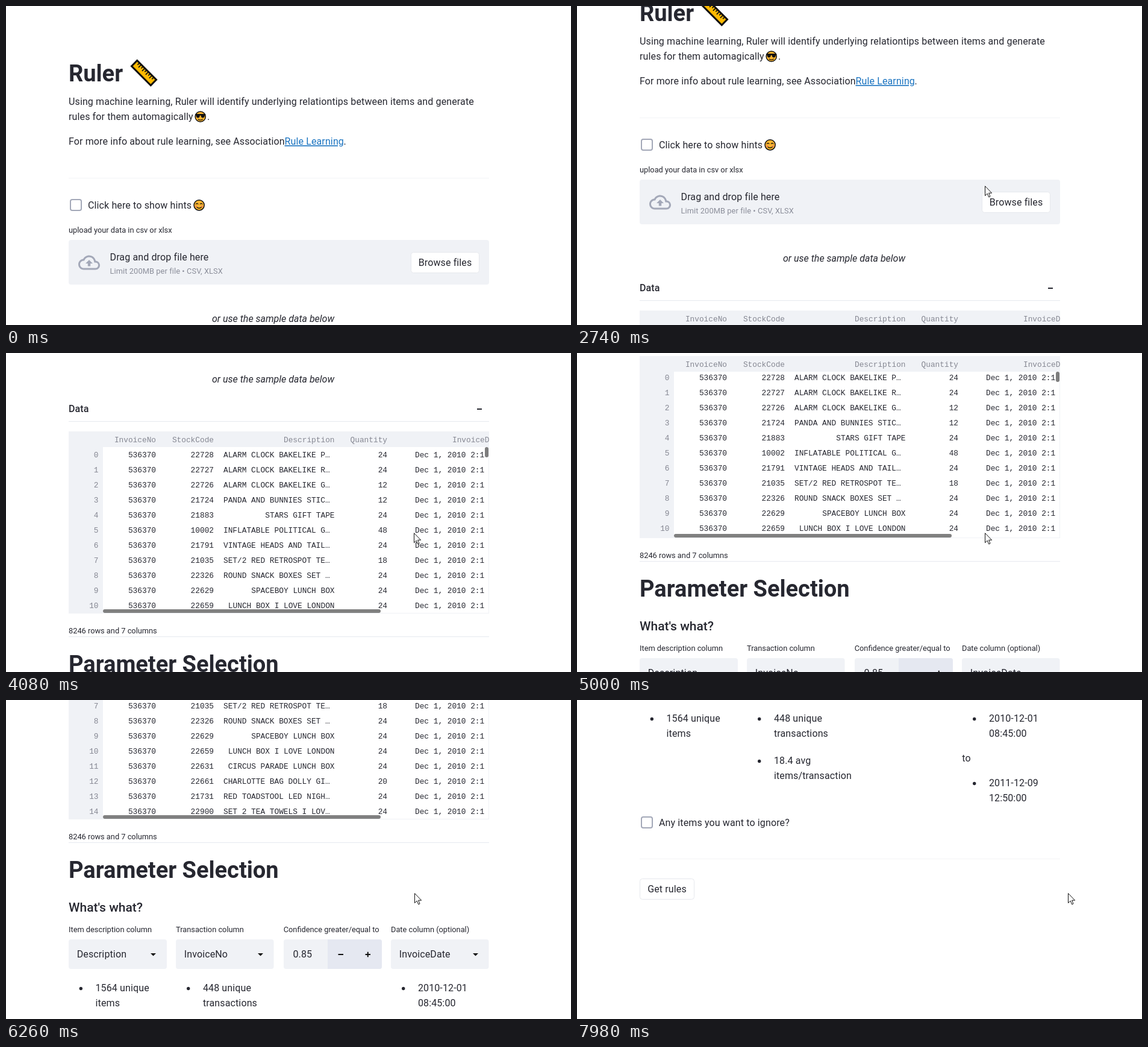
These frames come from a looping animation (938x529 px, 8 s). An HTML page:

```html
<!DOCTYPE html>
<html lang="en">
<head>
<meta charset="utf-8">
<title>Rule learning app</title>
<style>
  html, body { margin: 0; width: 100%; height: 100%; overflow: hidden; background: #fff; }
  svg { display: block; }
  text { font: 400 16px Roboto, sans-serif; letter-spacing: .008em; fill: #262730; }
  .h1 { font-weight: 700; font-size: 38px; letter-spacing: 0; }
  .h2 { font-weight: 500; font-size: 21px; letter-spacing: 0; }
  .bold { font-weight: 500; }
  .small { font-size: 12.8px; letter-spacing: 0; }
  .hint { font-size: 12.8px; fill: #8a8d99; }
  .italic { font-style: italic; letter-spacing: 0; }
  .link { fill: #1a73c0; text-decoration: underline; }
  .mono, .head { font: 12.8px "Liberation Mono", monospace; letter-spacing: 0; white-space: pre; }
  .head { fill: #858792; }
  .mid { text-anchor: middle; }
  .end { text-anchor: end; }
  .hover rect { stroke: #f63366; }
  .hover text { fill: #f63366; }
</style>
</head>
<body>
<svg id="stage" width="938" height="529" viewBox="0 0 938 529"></svg>
<script>
const LOOP = 8000;
const GREY = '#f0f2f6', LINE = '#e6e9ef', FAINT = '#f3f4f6', INK = '#262730';

// ---- drawing helpers ----
const text = (x, y, str, cls = '') => `<text x="${x}" y="${y}" class="${cls}">${str}</text>`;
const rect = (x, y, w, h, fill, r = 0, more = '') =>
  `<rect x="${x}" y="${y}" width="${w}" height="${h}" rx="${r}" fill="${fill}" ${more}/>`;
const path = (d, more) => `<path d="${d}" ${more}/>`;
const dot = (x, y, r = 2.7, fill = INK) => `<circle cx="${x}" cy="${y}" r="${r}" fill="${fill}"/>`;
const group = (x, y, body, more = '') => `<g transform="translate(${x} ${y}) ${more}">${body}</g>`;
const rule = (y, color) => rect(104, y, 698, 1, color);
const checkbox = (y, label) =>
  rect(107, y + 1, 18, 18, '#fff', 3, 'stroke="#a3a8b8" stroke-width="2"') + text(136, y + 16, label);
const button = (x, y, w, label) =>
  rect(x + .5, y + .5, w - 1, 34, '#fff', 4, 'stroke="#e6e8ed"') + text(x + w / 2, y + 23, label, 'mid');
const caret = (x, y) => path(`M${x - 4.5} ${y - 2}h9l-4.5 4.5z`, 'fill="#111"');
const bullet = (x, y, ...lines) =>
  dot(x, y - 4.5) + lines.map((line, i) => text(x + 24.2, y + 25 * i, line)).join('');
const select = (x, label, value, w = 162.5) =>
  text(x, 1094, label, 'small') + rect(x, 1106, w, 49, GREY, 4) +
  text(x + 13.7, 1136, value) + caret(x + 140.5, 1131);

// ---- emoji ----
function rulerEmoji() {
  let ticks = '';
  for (let i = 0; i < 9; i++) ticks += `M${-17 + i * 4.2}-6v${i % 2 ? 6 : 4}`;
  return group(229, 111,
    rect(-22.5, -6.5, 45, 13, '#ffb900', 0, 'stroke="#111" stroke-width="3"') +
    path(ticks, 'stroke="#111" stroke-width="1.7"'), 'rotate(45)');
}
const face = `<circle r="8.6" fill="#fcb52f" stroke="#111" stroke-width="1.5"/>`;
const coolEmoji = () => group(322.7, 183.5, face +
  path('M-8.5-4.5h17v2.5h-1.2Q6.8 2 4 2 1.2 2 .8-2h-1.6Q-1.2 2-4 2-6.8 2-7.3-2h-1.2z', 'fill="#111"') +
  path('M-4 4.2Q0 7 4 4.2', 'fill="none" stroke="#111" stroke-width="1.3"'));
const smileEmoji = () => group(320.6, 330.3, face + dot(-5, 2, 1.8, '#f78a4e') + dot(5, 2, 1.8, '#f78a4e') +
  path('M-5.5-1.5q2-3 4 0M1.5-1.5q2-3 4 0M-4 3.2Q0 6.8 4 3.2', 'fill="none" stroke="#111" stroke-width="1.3"'));

// ---- page sections, in page coordinates ----
const intro = () =>
  text(104, 125, 'Ruler', 'h1') + rulerEmoji() +
  text(104, 164, 'Using machine learning, Ruler will identify underlying relationtips between items and generate') +
  text(104, 189, 'rules for them automagically') + coolEmoji() + text(334, 189, '.') +
  text(104, 230, 'For more info about rule learning, see Association') +
  text(462.5, 230, 'Rule Learning', 'link') + text(560.5, 230, '.') +
  rule(285, FAINT) + checkbox(320, 'Click here to show hints') + smileEmoji();

const CLOUD = 'M19.35 10.04C18.67 6.59 15.64 4 12 4 9.11 4 6.6 5.64 5.35 8.04 2.34 8.36 0 10.91 0 14c0 3.31 2.69 6 6 6h13' +
  'c2.76 0 5-2.24 5-5 0-2.64-2.05-4.78-4.65-4.96zM19 18H6c-2.21 0-4-1.79-4-4 0-2.05 1.53-3.76 3.56-3.97l1.07-.11.5-.95' +
  'C8.08 7.14 9.94 6 12 6c2.62 0 4.88 1.86 5.39 4.43l.3 1.5 1.53.11A2.98 2.98 0 0 1 22 15c0 1.65-1.35 3-3 3z' +
  'M8 13h2.55v3h2.9v-3H16l-4-4z';

const upload = () =>
  text(104, 376, 'upload your data in csv or xlsx', 'small') +
  rect(104, 388, 698, 74, GREY, 4) +
  group(120, 407.5, path(CLOUD, 'fill="#a3a8b8" fill-rule="evenodd"'), 'scale(1.5)') +
  text(172.5, 422, 'Drag and drop file here') +
  text(172.5, 444, 'Limit 200MB per file • CSV, XLSX', 'hint') +
  `<g id="browse">${button(672, 408, 114, 'Browse files')}</g>` +
  text(342, 524, 'or use the sample data below', 'italic');

const ROWS = `22728|ALARM CLOCK BAKELIKE P…|24
22727|ALARM CLOCK BAKELIKE R…|24
22726|ALARM CLOCK BAKELIKE G…|12
21724|PANDA AND BUNNIES STIC…|12
21883|STARS GIFT TAPE|24
10002|INFLATABLE POLITICAL G…|48
21791|VINTAGE HEADS AND TAIL…|24
21035|SET/2 RED RETROSPOT TE…|18
22326|ROUND SNACK BOXES SET …|24
22629|SPACEBOY LUNCH BOX|24
22659|LUNCH BOX I LOVE LONDON|24
22631|CIRCUS PARADE LUNCH BOX|24
22661|CHARLOTTE BAG DOLLY GI…|20
21731|RED TOADSTOOL LED NIGH…|24
22900|SET 2 TEA TOWELS I LOV…|24`.split('\n').map(row => row.split('|'));

function tableRow([code, item, quantity], i) {
  const y = 648 + 25 * i;
  return text(153.5, y, i, 'head end') + text(249, y, 536370, 'mono end') + text(345, y, code, 'mono end') +
    (item.endsWith('…') ? text(361, y, item, 'mono') : text(545.5, y, item, 'mono end')) +
    text(633, y, quantity, 'mono end') + text(679, y, 'Dec 1, 2010 2:1', 'mono');
}

const table = () =>
  text(104, 573, 'Data', 'bold') + rect(782, 567, 8, 2, INK) + rule(588, LINE) +
  rect(104, 605, 698, 26, GREY) + rect(104, 631, 57, 276, GREY) +
  rect(161, 906, 641, 1, GREY) + rect(801, 631, 1, 276, GREY) +
  '<g clip-path="url(#header)">' +
  text(249, 623, 'InvoiceNo', 'head end') + text(345, 623, 'StockCode', 'head end') +
  text(545.5, 623, 'Description', 'head end') + text(633, 623, 'Quantity', 'head end') +
  text(741, 623, 'InvoiceDate', 'head') + '</g>' +
  `<g clip-path="url(#body)"><g id="rows">${ROWS.map(tableRow).join('')}</g></g>` +
  rect(795, 631, 6, 17, '#7d7d7d', 3) + rect(161, 900, 461, 6, '#808080', 3) +
  text(104, 940, '8246 rows and 7 columns', 'small') + rule(945, LINE);

const parameters = () =>
  text(104, 1004, 'Parameter Selection', 'h1') + text(104, 1060, "What's what?", 'h2') +
  select(104, 'Item description column', 'Description', 163) +
  select(282, 'Transaction column', 'InvoiceNo') +
  text(460.7, 1094, 'Confidence greater/equal to', 'small') +
  rect(461, 1106, 163, 49, GREY, 4) + rect(534, 1106, 90, 49, '#e5e8f1', 4) + rect(534, 1106, 6, 49, '#e5e8f1') +
  text(476.5, 1136, '0.85') +
  path('M551.5 1131h8.5M596.5 1131h8.5M600.75 1126.7v8.6', 'stroke="#111" stroke-width="2"') +
  select(639, 'Date column (optional)', 'InvoiceDate') +
  bullet(124.3, 1192, '1564 unique', 'items') +
  bullet(302.7, 1192, '448 unique', 'transactions') +
  bullet(302.7, 1262, '18.4 avg', 'items/transaction') +
  bullet(659.7, 1192, '2010-12-01', '08:45:00') + text(639.3, 1258, 'to') +
  bullet(659.7, 1299, '2011-12-09', '12:50:00') +
  checkbox(1349, 'Any items you want to ignore?') +
  rule(1419, FAINT) + button(104, 1452, 91, 'Get rules');

const stage = document.getElementById('stage');
stage.innerHTML =
  `<defs><clipPath id="header">${rect(104, 605, 698, 26)}</clipPath>` +
  `<clipPath id="body">${rect(104, 631, 698, 275)}</clipPath></defs>` +
  `<g id="page">${intro() + upload() + table() + parameters()}</g>` +
  `<g id="pointer">${path('M.5.7V16.6L4.2 13.1 6.7 18.9 9 17.9 6.6 12.2H11.6Z', 'fill="#fff" stroke="#111"')}</g>`;
const [page, rows, browse, pointer] =
  ['page', 'rows', 'browse', 'pointer'].map(id => document.getElementById(id));

// ---- motion ----
// Screen updates come in bursts: [first, last, count].
const BURSTS = [
  [150, 150, 1], [320, 380, 3], [590, 590, 1], [870, 1200, 8], [1530, 1530, 1],
  [2550, 3070, 10], [3430, 3610, 5], [3750, 4360, 14], [5000, 5180, 4],
  [5510, 5830, 6], [5980, 6720, 15], [6850, 7080, 6], [7230, 7980, 15]
];
// Wheel notches: [start, distance].
const PAGE_WHEEL = [
  [2530, 100], [2870, 100], [3385, 100], [3730, 100], [3950, 100], [4170, 100],
  [5960, 100], [6209, 100], [6520, 100], [7210, 100], [7490, 100], [7780, 56]
];
const TABLE_WHEEL = [[4981, 100]];
const NOTCH_MS = 190;
// Pointer tip: [time, x, y].
const POINTER = [
  [0, 873, 540], [150, 873, 514], [270, 873, 514], [380, 764, 445], [589, 764, 445],
  [590, 763, 442], [820, 763, 442], [1010, 735, 375], [1105, 690, 318], [1153, 668, 301],
  [1200, 677, 299], [1529, 677, 299], [1530, 677, 298], [5450, 677, 298], [5574, 783, 312],
  [5638, 730, 320], [5702, 620, 320], [5830, 678, 320], [6800, 678, 320], [6850, 700, 313],
  [6942, 780, 320], [7080, 815, 320], [LOOP, 815, 320]
];

function snap(t) {
  const burst = BURSTS.findLast(([first]) => first <= t);
  if (!burst) return 0;
  const [first, last, count] = burst;
  if (t >= last) return last;
  const gap = (last - first) / (count - 1);
  return first + Math.floor((t - first) / gap + 1e-6) * gap;
}

function scrolled(notches, t) {
  return Math.round(notches.reduce((sum, [start, distance]) => {
    const x = Math.min(1, Math.max(0, (t - start) / NOTCH_MS));
    return sum + distance * x * x * (3 - 2 * x);
  }, 0));
}

function pointerAt(t) {
  const i = POINTER.findIndex(([time]) => time > t);
  const [t0, x0, y0] = POINTER[i - 1], [t1, x1, y1] = POINTER[i];
  const k = (t - t0) / (t1 - t0);
  return [Math.round(x0 + (x1 - x0) * k), Math.round(y0 + (y1 - y0) * k)];
}

function render(time) {
  const t = snap(time);
  const top = scrolled(PAGE_WHEEL, t);
  const [x, y] = pointerAt(t);
  page.setAttribute('transform', `translate(0 ${-top})`);
  rows.setAttribute('transform', `translate(0 ${-scrolled(TABLE_WHEEL, t)})`);
  pointer.setAttribute('transform', `translate(${x} ${y})`);
  const over = x >= 672 && x < 786 && y + top >= 408 && y + top < 443;
  browse.setAttribute('class', over ? 'hover' : '');
}

const start = performance.now();
function tick() {
  render((performance.now() - start) % LOOP);
  requestAnimationFrame(tick);
}
tick();
</script>
</body>
</html>
```
